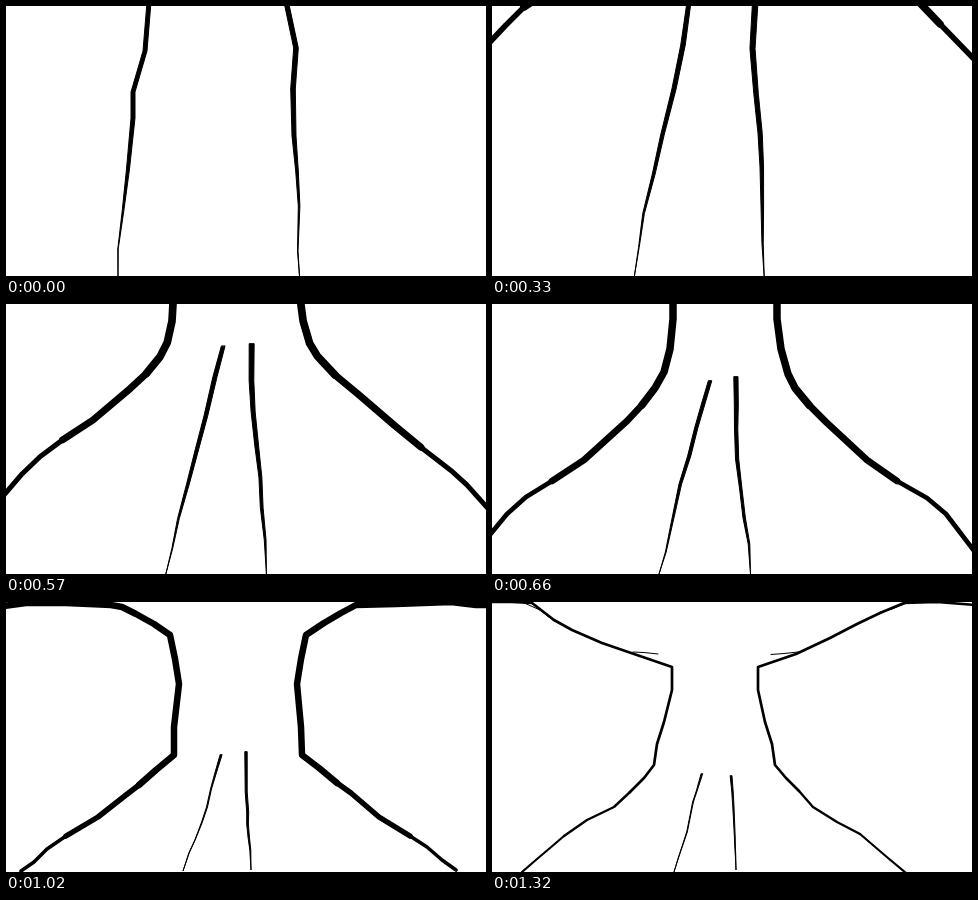
An HTML page without scripts that plays this animation: 480x270 px, repeating every 1.35 s.

```html
<!DOCTYPE html>
<html lang="en">
<head>
<meta charset="utf-8">
<title>Ink lines</title>
<style>
html, body { margin: 0; width: 100%; height: 100%; overflow: hidden; background: #fff; }
svg { display: block; width: 480px; height: 270px; }
path { animation: 1350ms infinite; stroke: #000; stroke-linejoin: round; stroke-linecap: round; fill: none; }

/* Each stretch is stepped so that the drawing changes every 30 ms. */
.inner { fill: #000; stroke-width: 1; }
.inner.left { animation-name: inner-left; }
.inner.right { animation-name: inner-right; }
.body.left { animation-name: body-left, body-width; }
.body.right { animation-name: body-right, body-width; }
.shin.left { animation-name: shin-left, shin-width; }
.shin.right { animation-name: shin-right, shin-width; }
.foot.left { animation-name: foot-left, foot-width; }
.foot.right { animation-name: foot-right, foot-width; }
.stray { animation-name: stray; }

@keyframes inner-left {
  0% { animation-timing-function: steps(7); d: path("M141-4 137 45 125 86 125 112 120.5 163 116.2 205 111.8 243 112 270 112.2 243 117.8 205 123.5 163 129 112 129 86 141 45 145-4Z"); }
  15.5556% { animation-timing-function: steps(8); d: path("M176-4 175 38 168 70 156.3 122 147.7 160 140.2 205 137.3 243 134.5 270 137.7 243 141.8 205 150.3 160 159.7 122 172 70 179 38 180-4Z"); }
  33.3333% { animation-timing-function: steps(7); d: path("M214-4 202.5 40 191.8 96 181 136 172.5 178 161.3 210 155.8 240 150.3 270 156.6 240 163 210 175.5 178 184.6 136 196.2 96 207.5 40 218-4Z"); }
  48.8889% { animation-timing-function: steps(7); d: path("M216.3 77 210.3 97 202.6 124 195.6 152 187 180 179.3 218 173.4 248 167 270 174.2 248 181 218 189.6 180 198.8 152 205.8 124 213.8 97 219.7 77Z"); }
  64.4444% { animation-timing-function: steps(5); d: path("M213.8 128 209 144 203 163 198.5 180 192.5 203 186.5 227 180.8 250 173 270 181.2 250 187.6 227 193.8 203 200.5 180 205 163 211.2 144 216.2 128Z"); }
  75.5556% { animation-timing-function: steps(10); d: path("M214 153 208.6 172 204.5 187 200.5 205 195.6 220 188.8 238 182.8 251 177 269 183.2 251 189.2 238 196.4 220 201.5 205 205.5 187 210 172 216 153Z"); }
  97.7778%, 100% { d: path("M209 172 204.6 188 200.6 200 197.7 215 194.7 230 189.8 245 185.9 257 182 270 186.1 257 190.2 245 195.3 230 198.3 215 201.4 200 205.4 188 210.6 172Z"); }
}
@keyframes inner-right {
  0% { animation-timing-function: steps(7); d: path("M278-4 287.7 42 284.7 83 286 130 289.7 165 292.3 200 291.5 245 293.5 270 292 245 293.9 200 292.3 165 290 130 289.3 83 292.3 42 282.5-4Z"); }
  15.5556% { animation-timing-function: steps(8); d: path("M276-4 271.7 40 275 90 276 130 276 165 279.2 210 278.9 245 281.3 270 279.5 245 281.2 210 279.5 165 280 130 279 90 276.3 40 281-4Z"); }
  33.3333% { animation-timing-function: steps(7); d: path("M245-4 244.2 45 248.6 85 256 125 260 157 258.8 190 261 230 263 270 263 230 262 190 263.6 157 260.5 125 253.6 85 249.8 45 251-4Z"); }
  48.8889% { animation-timing-function: steps(7); d: path("M241.8 73 242.3 100 242.5 125 243.5 155 247.6 185 251 214 256.2 240 258.5 270 257.8 240 253.4 214 250 185 246.7 155 245.8 125 246.3 100 246 73Z"); }
  64.4444% { animation-timing-function: steps(5); d: path("M239.5 127 239.8 145 240.7 170 242 190 244 213 246.2 235 250 253 257 270 250.6 253 247.6 235 245.6 213 244 190 243 170 242.4 145 242.5 127Z"); }
  75.5556% { animation-timing-function: steps(10); d: path("M238.8 150 239 170 239.2 190 240.7 210 240.7 222 242 235 243.8 248 245 268 244.8 248 243.4 235 242.4 222 242.7 210 241.2 190 241.2 170 241.2 150Z"); }
  97.7778%, 100% { d: path("M238.2 174 239.8 190 240.8 205 241.6 220 242.4 235 242.8 245 243.4 255 244 268 243.8 255 243.4 245 243.2 235 242.6 220 242 205 241.2 190 240 174Z"); }
}

/* Arm, torso and thigh in one line */
@keyframes body-left {
  0%, 15.5556% { animation-timing-function: steps(8); d: path("M-43-390-20-395 20-395 65-390 76-388 90-382 108-372 110-340 110-250 110-210 110-180 107-161 102-149 88-133"); }
  33.3333% { animation-timing-function: steps(7); d: path("M-3-230 20-235 60-235 105-230 116-228 130-222 148-212 150-180 150-90 150-50 150-20 147-1 142 11 128 27"); }
  48.8889% { animation-timing-function: steps(7); d: path("M-3-140 20-145 60-145 105-140 116-138 130-132 148-122 181-110 181-20 181 15 178 45 172 68 163 84 150 101"); }
  64.4444% { animation-timing-function: steps(5); d: path("M-3-50 20-55 60-55 105-50 116-48 130-42 148-32 167-20 167 10 169 60 168 100 164 128 157 139 139 150"); }
  75.5556% { animation-timing-function: steps(10); d: path("M-3 4 20 1 60 1 105 3 116 5 130 12 148 22 164 33 169 57 173 82 168 125 168 153 150 168 133 183"); }
  97.7778%, 100% { d: path("M-3 0 20 0 40 1 62 18 80 28 110 41 142 52 180 65 180 88 172 120 165 142 162 163 152 176 138 190"); }
}
@keyframes body-right {
  0%, 15.5556% { animation-timing-function: steps(8); d: path("M523-390 510-392 485-395 430-393 390-390 375-382 358-372 340-340 340-250 344-210 348-180 354-161 362-151 385-128"); }
  33.3333% { animation-timing-function: steps(7); d: path("M483-230 470-232 445-235 390-233 350-230 335-222 318-212 300-180 300-90 304-50 308-20 314-1 322 9 345 31"); }
  48.8889% { animation-timing-function: steps(7); d: path("M483-140 470-142 445-145 390-143 350-140 335-132 318-122 285-110 285-20 285 15 289 45 296 70 303 84 317 101"); }
  64.4444% { animation-timing-function: steps(5); d: path("M483-50 470-52 445-55 390-53 350-50 335-42 318-32 292-20 292 10 290 60 292 100 296 125 303 137 320 150"); }
  75.5556% { animation-timing-function: steps(10); d: path("M483 3 470 3 445 0 390 2 350 3 335 11 318 21 300 33 295 57 291 82 295 125 296 153 313 166 331 181"); }
  97.7778%, 100% { d: path("M483 3 445 0 412 1 388 11 365 22 338 36 304 52 266 65 266 88 273 120 280 142 283 163 294 176 307 189"); }
}
@keyframes shin-left {
  0%, 15.5556% { animation-timing-function: steps(8); d: path("M88-133 70-119 40-97 12-79"); }
  33.3333% { animation-timing-function: steps(7); d: path("M128 27 110 41 80 63 52 81"); }
  48.8889% { animation-timing-function: steps(7); d: path("M150 101 135 117 92 156 60 177"); }
  64.4444% { animation-timing-function: steps(5); d: path("M139 150 117 163 94 190 68 208"); }
  75.5556% { animation-timing-function: steps(10); d: path("M133 183 120 193 92 215 60 234"); }
  97.7778%, 100% { d: path("M138 190 122 205 95 218 72 234"); }
}
@keyframes shin-right {
  0%, 15.5556% { animation-timing-function: steps(8); d: path("M385-128 420-104 446-85 468-62"); }
  33.3333% { animation-timing-function: steps(7); d: path("M345 31 380 56 406 75 428 98"); }
  48.8889% { animation-timing-function: steps(7); d: path("M317 101 334 118 375 156 405 177"); }
  64.4444% { animation-timing-function: steps(5); d: path("M320 150 342 164 369 192 391 207"); }
  75.5556% { animation-timing-function: steps(10); d: path("M331 181 345 191 373 215 404 234"); }
  97.7778%, 100% { d: path("M307 189 321 205 345 220 368 232"); }
}
@keyframes foot-left {
  0%, 15.5556% { animation-timing-function: steps(8); d: path("M12-79-6-61-22-44-44-20"); }
  33.3333% { animation-timing-function: steps(7); d: path("M52 81 34 99 18 116-4 140"); }
  48.8889% { animation-timing-function: steps(7); d: path("M60 177 34 193 15 210-3 232"); }
  64.4444% { animation-timing-function: steps(5); d: path("M68 208 46 225 25 245 2 268"); }
  75.5556% { animation-timing-function: steps(10); d: path("M60 234 41 247 28 260 15 269"); }
  97.7778%, 100% { d: path("M72 234 58 246 45 257 30 270"); }
}
@keyframes foot-right {
  0%, 15.5556% { animation-timing-function: steps(8); d: path("M468-62 502-27 510-18 523-11"); }
  33.3333% { animation-timing-function: steps(7); d: path("M428 98 462 133 470 142 483 149"); }
  48.8889% { animation-timing-function: steps(7); d: path("M405 177 435 194 454 210 483 248"); }
  64.4444% { animation-timing-function: steps(5); d: path("M391 207 415 227 434 247 458 267"); }
  75.5556% { animation-timing-function: steps(10); d: path("M404 234 421 245 436 258 450 268"); }
  97.7778%, 100% { d: path("M368 232 382 244 396 256 414 271"); }
}

@keyframes body-width {
  0%, 33.3333% { animation-timing-function: steps(14); stroke-width: 8px; }
  64.4444% { animation-timing-function: steps(5); stroke-width: 7px; }
  75.5556% { animation-timing-function: steps(10); stroke-width: 6.5px; }
  97.7778%, 100% { stroke-width: 2.7px; }
}
@keyframes shin-width {
  0%, 33.3333% { animation-timing-function: steps(14); stroke-width: 7.5px; }
  64.4444% { animation-timing-function: steps(5); stroke-width: 6px; }
  75.5556% { animation-timing-function: steps(10); stroke-width: 5.5px; }
  97.7778%, 100% { stroke-width: 2.4px; }
}
@keyframes foot-width {
  0%, 33.3333% { animation-timing-function: steps(14); stroke-width: 5.5px; }
  64.4444% { animation-timing-function: steps(5); stroke-width: 4px; }
  75.5556% { animation-timing-function: steps(10); stroke-width: 3.6px; }
  97.7778%, 100% { stroke-width: 2.2px; }
}
@keyframes stray {
  0% { animation-timing-function: step-end; visibility: hidden; }
  93.3333%, 100% { visibility: visible; }
}
</style>
</head>
<body>
<svg viewBox="0 0 480 270">
  <path class="inner left"/>
  <path class="inner right"/>
  <path class="body left"/>
  <path class="body right"/>
  <path class="shin left"/>
  <path class="shin right"/>
  <path class="foot left"/>
  <path class="foot right"/>
  <path class="stray" d="M30 0 48 8 62 19M141 50 152 50.5 166 52M415 1 400 7 388 10M279 52.5 292 51.5 306 50"/>
</svg>
</body>
</html>
```
